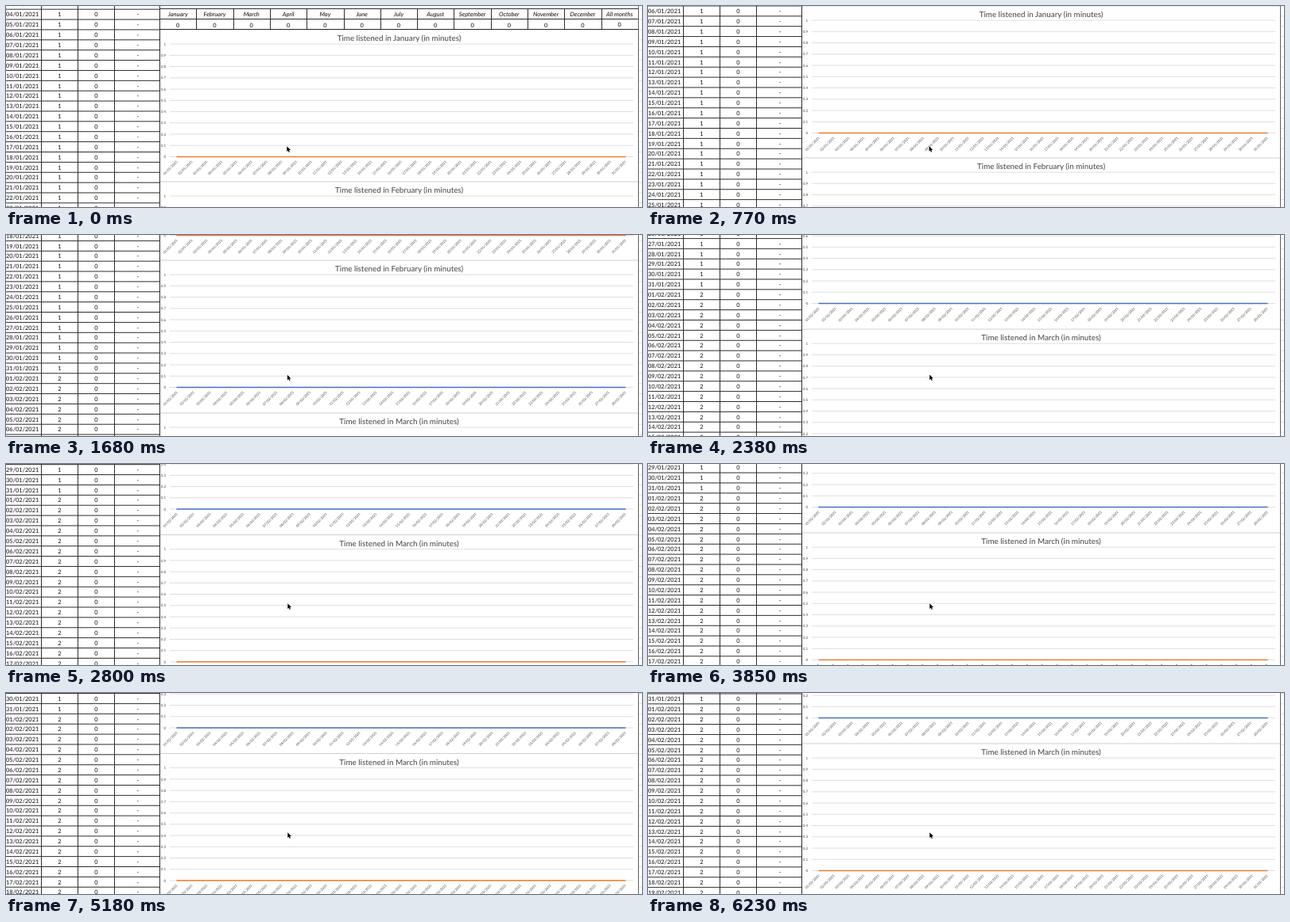
An HTML page with a canvas that plays this animation: 800x254 px, repeating every 6.3 s.

```html
<!DOCTYPE html>
<html lang="en">
<head>
<meta charset="utf-8">
<title>Listening time sheet</title>
<style>
  html, body { margin: 0; width: 100%; height: 100%; overflow: hidden; background: #fff; }
  canvas { display: block; width: 800px; height: 254px; }
</style>
</head>
<body>
<canvas id="stage" width="800" height="254"></canvas>
<script>
const W = 800, H = 254, LOOP = 6300, STEP = 70;
const ROW = 12.88, FIRST_ROW = 10.6, FIRST_DAY = 4;
const SHEET_X = 193, SHEET_END = 795, MONTH_W = 46.3;
const INK = '#1c1c1c', RULE = '#2c2c2c', GREY = '#505050', GRID = '#dedede';
const ORANGE = '#ed7d31', BLUE = '#4472c4';
const MONTHS = ['January', 'February', 'March', 'April', 'May', 'June', 'July',
  'August', 'September', 'October', 'November', 'December', 'All months'];
const CHARTS = [
  { month: 0, days: 31, top: 30, color: ORANGE },
  { month: 1, days: 28, top: 222, color: BLUE },
  { month: 2, days: 31, top: 415, color: ORANGE }
];
const CHART_H = 193;
// [time in ms, scroll offset in px]
const SCROLL = [[0, 0], [770, 30], [1680, 190], [2800, 325.5],
  [3850, 328], [4410, 331], [6230, 351]];

const ctx = document.getElementById('stage').getContext('2d');
ctx.textRendering = 'geometricPrecision';

const slopes = SCROLL.slice(1).map(([t, y], i) => (y - SCROLL[i][1]) / (t - SCROLL[i][0]));
const tangents = SCROLL.map((_, i) => {
  const a = slopes[i - 1], b = slopes[i];
  if (a === undefined) return b * 0.4;
  if (b === undefined) return a;
  return 2 * a * b / (a + b);
});

// Monotone cubic through the scroll points.
function scrollAt(t) {
  let i = 0;
  while (i < SCROLL.length - 2 && t > SCROLL[i + 1][0]) i++;
  const [t0, y0] = SCROLL[i], [t1, y1] = SCROLL[i + 1];
  const d = t1 - t0, u = Math.min(1, (t - t0) / d), v = 1 - u;
  return y0 * (1 + 2 * u) * v * v + y1 * u * u * (3 - 2 * u)
    + d * u * v * (tangents[i] * v - tangents[i + 1] * u);
}

function rect(x, y, w, h, color) {
  ctx.fillStyle = color;
  ctx.fillRect(x, y, w, h);
}

const hLine = (x0, x1, y, color) => rect(x0, y - 0.5, x1 - x0, 1, color);
const vLine = (x, y0, y1, color) => rect(Math.round(x), y0, 1, y1 - y0, color);

function text(str, x, y, size, align, color = INK, style = '500') {
  ctx.font = `${style} ${size}px Lato, "Open Sans", sans-serif`;
  ctx.textAlign = align;
  ctx.fillStyle = color;
  ctx.fillText(str, x, y + size * 0.37);
}

function dateLabel(month, day) {
  const date = new Date(2021, month, day);
  const pad = n => String(n).padStart(2, '0');
  return `${pad(date.getDate())}/${pad(date.getMonth() + 1)}/2021`;
}

function drawRows(scroll) {
  const first = Math.max(1, FIRST_DAY + Math.floor((scroll - FIRST_ROW) / ROW) - 1);
  for (let day = first; ; day++) {
    const y = FIRST_ROW + (day - FIRST_DAY) * ROW - scroll;
    const top = y - ROW / 2;
    if (top > H) break;
    hLine(0, SHEET_X, top, RULE);
    hLine(SHEET_END, W, top, GRID);
    text(dateLabel(0, day), 41.3, y, 7.45, 'right');
    text(new Date(2021, 0, day).getMonth() + 1, 67.5, y, 7.45, 'center');
    text('0', 113.5, y, 7.45, 'center');
    text('-', 166, y, 7.45, 'center');
  }
  [44, 90, 136, SHEET_X].forEach(x => vLine(x, 0, H, RULE));
}

function drawHeader(scroll) {
  if (scroll > 32) return;
  [3.5, 16.5, 29.5].forEach(y => hLine(SHEET_X, SHEET_END, y - scroll, RULE));
  MONTHS.forEach((name, i) => {
    const left = SHEET_X + i * MONTH_W, mid = left + MONTH_W / 2;
    vLine(left, 4 - scroll, 30 - scroll, RULE);
    text(name, mid, 10.2 - scroll, 7.5, 'center', INK, 'italic 500');
    text('0', mid, (i === 12 ? 23 : 24) - scroll, 7.45, 'center');
  });
}

function drawChart({ month, days, top, color }, scroll) {
  const y = top - scroll;
  if (y > H || y + CHART_H < 0) return;
  const zero = y + 160.5, span = 142.4;
  hLine(SHEET_X + 1, SHEET_END, y, '#d0d0d0');
  text(`Time listened in ${MONTHS[month]} (in minutes)`, 494.5, y + 10.8, 9.8, 'center', GREY);
  for (let i = 0; i <= 10; i++) {
    const gy = zero - span * i / 10;
    hLine(206, 789, gy, GRID);
    text(i / 10, 201, gy, 4.5, 'right', GREY);
  }
  for (let day = 1; day <= days; day++) {
    ctx.save();
    ctx.translate(215 + 564 * (day - 1) / (days - 1), zero + 5.5);
    ctx.rotate(-Math.PI / 4);
    text(dateLabel(month, day), 0, 0, 4.25, 'right', GREY);
    ctx.restore();
  }
  ctx.strokeStyle = color;
  ctx.lineWidth = 1.5;
  ctx.lineCap = 'round';
  ctx.beginPath();
  ctx.moveTo(215, zero);
  ctx.lineTo(779, zero);
  ctx.stroke();
}

function drawCursor(t) {
  const shift = Math.min(1, t / 2800);
  ctx.save();
  ctx.translate(353.3 + shift, 177.3 - shift);
  ctx.beginPath();
  [[0, 0], [0, 6.7], [1.5, 5.4], [2.5, 7.6], [3.6, 7.1], [2.7, 4.9], [4.7, 4.7]]
    .forEach(([x, y]) => ctx.lineTo(x, y));
  ctx.closePath();
  ctx.strokeStyle = '#fff';
  ctx.lineWidth = 1;
  ctx.stroke();
  ctx.fillStyle = '#000';
  ctx.fill();
  ctx.restore();
}

function draw(t) {
  const scroll = scrollAt(t);
  rect(0, 0, W, H, '#fff');
  drawRows(scroll);
  CHARTS.forEach(chart => drawChart(chart, scroll));
  drawHeader(scroll);
  vLine(SHEET_END, 0, H, '#606060');
  drawCursor(t);
}

const start = performance.now();
function tick() {
  const t = (performance.now() - start) % LOOP;
  draw(Math.floor(t / STEP) * STEP);
  requestAnimationFrame(tick);
}
tick();
</script>
</body>
</html>
```
